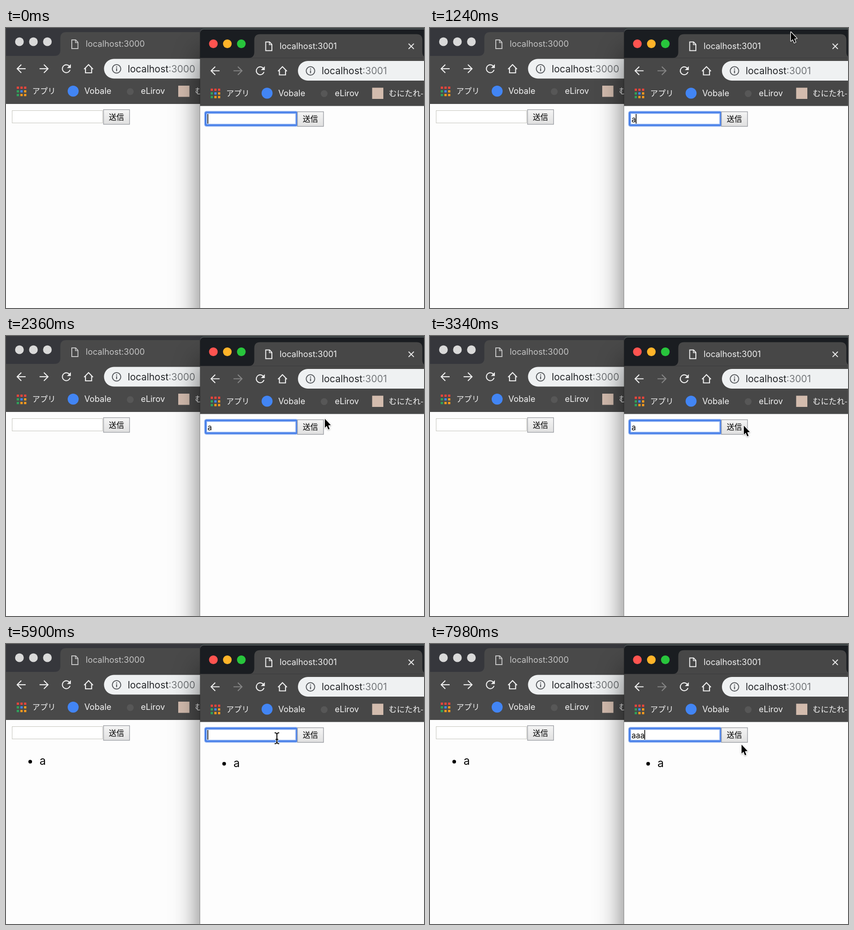
These frames come from a looping animation (915 by 612 pixels, 8 s). An HTML page with a canvas:

```html
<!DOCTYPE html>
<html lang="ja">
<head>
<meta charset="utf-8">
<title>Two synced windows</title>
<style>
  html, body { margin: 0; width: 100%; height: 100%; overflow: hidden; background: #fdfdfd; }
  canvas { display: block; width: 915px; height: 612px; }
</style>
</head>
<body>
<canvas id="stage" width="915" height="612"></canvas>
<script>
const ctx = document.getElementById('stage').getContext('2d');
const LOOP = 8000;
const LATIN = 'Inter, sans-serif';
const KANA = '"Noto Sans CJK JP", "Noto Sans CJK", sans-serif';
const RIGHT = { x: 424.5, y: 4.5 };

// Moments of the session, in ms
const FIRST_KEY = 800, SUBMIT = 3900, REFOCUS = 5500;
const KEYS = [6400, 6600, 6800];
const POINTER_SHOWN = 1000, POINTER_BACK = 7000;
const PATH = [
  [1000, 792, 2], [1240, 789, 8], [1700, 757, 70], [2200, 701, 175],
  [2360, 697, 180], [2700, 686, 195], [3400, 686, 195], [3750, 669, 195],
  [4900, 669, 195], [5350, 593, 206], [7000, 593, 206], [7600, 681, 219]
];

function text(str, x, y, size, color, family = LATIN) {
  ctx.font = `${size}px ${family}`;
  ctx.fillStyle = color;
  ctx.fillText(str, x, y);
}

function circle(x, y, r, color) {
  ctx.beginPath();
  ctx.arc(x, y, r, 0, Math.PI * 2);
  ctx.fillStyle = color;
  ctx.fill();
}

function rect(x, y, w, h, color) {
  ctx.fillStyle = color;
  ctx.fillRect(x, y, w, h);
}

function line(points, color, width = 2.2, close = false) {
  ctx.beginPath();
  points.forEach(([x, y], i) => i ? ctx.lineTo(x, y) : ctx.moveTo(x, y));
  if (close) ctx.closePath();
  ctx.strokeStyle = color;
  ctx.lineWidth = width;
  ctx.stroke();
}

function arrowIcon(cx, dir, color) {
  const tip = cx + dir * 9;
  line([[cx - dir * 9.5, 89], [tip, 89]], color);
  line([[cx, 80], [tip, 89], [cx, 98]], color);
}

function reloadIcon(color) {
  ctx.beginPath();
  ctx.arc(132, 89, 8.6, 0.3, Math.PI * 2 - 0.7);
  ctx.strokeStyle = color;
  ctx.lineWidth = 2.2;
  ctx.stroke();
  ctx.beginPath();
  ctx.moveTo(142, 79);
  ctx.lineTo(142, 87.5);
  ctx.lineTo(133.5, 87.5);
  ctx.fillStyle = color;
  ctx.fill();
}

function homeIcon(color) {
  line([[171, 90], [180.7, 80], [190.4, 90]], color);
  line([[174, 88], [174, 98], [187.4, 98], [187.4, 88]], color);
}

function fileIcon(color) {
  line([[144, 26], [152.5, 26], [157.5, 31.5], [157.5, 45], [144, 45]], color, 2, true);
  line([[152, 26], [152, 32], [157.5, 32]], color, 1.6);
}

function tab(right, color) {
  ctx.beginPath();
  ctx.moveTo(106, 61);
  ctx.quadraticCurveTo(119, 61, 119, 48);
  ctx.lineTo(119, 22);
  ctx.quadraticCurveTo(119, 9, 132, 9);
  ctx.lineTo(right - 13, 9);
  ctx.quadraticCurveTo(right, 9, right, 22);
  ctx.lineTo(right, 48);
  ctx.quadraticCurveTo(right, 61, right + 13, 61);
  ctx.fillStyle = color;
  ctx.fill();
}

function addressBar(port, forwardColor) {
  const icon = '#f0f0f0';
  arrowIcon(33.5, -1, icon);
  arrowIcon(83, 1, forwardColor);
  reloadIcon(icon);
  homeIcon(icon);
  ctx.beginPath();
  ctx.roundRect(214.5, 67.5, 520, 43, 21.5);
  ctx.fillStyle = '#eff1f2';
  ctx.fill();
  ctx.beginPath();
  ctx.arc(242, 89.3, 9.3, 0, Math.PI * 2);
  ctx.strokeStyle = '#56595d';
  ctx.lineWidth = 2;
  ctx.stroke();
  rect(241, 84, 2.2, 2.4, '#56595d');
  rect(241, 88, 2.2, 6.4, '#56595d');
  text('localhost', 266.5, 96.7, 20.9, '#222427');
  const hostWidth = ctx.measureText('localhost').width;
  text(':' + port, 266.5 + hostWidth, 96.7, 20.9, '#74777a');
}

function bookmarks() {
  const white = '#f4f4f4';
  const [r, g, b, o] = ['#e8453c', '#2fa35a', '#4285f4', '#f39a1f'];
  [r, r, r, g, b, o, g, o, o].forEach((color, i) =>
    rect(23.5 + i % 3 * 8, 128 + Math.floor(i / 3) * 8, 5, 5, color));
  text('アプリ', 57.5, 144, 17, white, KANA);
  circle(147, 138, 12, '#4285f4');
  text('Vobale', 171.5, 144.3, 18.2, white);
  circle(272, 139, 7.5, '#575757');
  text('eLirov', 295.3, 144.3, 18.2, white);
  rect(377, 126, 24.5, 24.5, '#d3bcae');
  text('むにたれ-', 413.5, 144, 17.4, white, KANA);
}

function inputBox() {
  rect(13, 180, 199, 28, '#ffffff');
  ctx.lineWidth = 1;
  ctx.strokeStyle = '#c4c4bc';
  ctx.strokeRect(13.5, 180.5, 198, 27);
}

function button() {
  const shade = ctx.createLinearGradient(0, 178, 0, 211);
  shade.addColorStop(0, '#f5f5f5');
  shade.addColorStop(1, '#e0e0e0');
  rect(213, 178, 58, 33, shade);
  ctx.lineWidth = 1.3;
  ctx.strokeStyle = '#96989e';
  ctx.strokeRect(213.5, 178.5, 57, 32);
  text('送信', 225, 200.8, 16.8, '#000', KANA);
}

function focusRing() {
  for (const [width, color] of [[7, 'rgba(88,140,238,.4)'], [4, '#4b82e9']]) {
    ctx.beginPath();
    ctx.roundRect(12.5, 180, 199.5, 28, 2);
    ctx.lineWidth = width;
    ctx.strokeStyle = color;
    ctx.stroke();
  }
}

function page(state, focused) {
  inputBox();
  if (focused) {
    focusRing();
    text(state.typed, 16.8, 201, 16.8, '#000');
    if (state.caret) {
      const x = 16.5 + ctx.measureText(state.typed).width;
      rect(x, 183.5, 1.6, 21, '#000');
    }
  }
  button();
  if (state.sent) {
    circle(53, 257.2, 4, '#000');
    text('a', 73.5, 264, 24.4, '#000');
  }
}

function browser(look, state, focused) {
  rect(0, -5, 500, 70, look.bar);
  tab(look.tabRight, look.chrome);
  rect(0, 61, 500, 105, look.chrome);
  rect(0, 166, 500, 460, '#fdfdfd');
  look.dots.forEach((color, i) => circle(29.4 + i * 30.6, 30, 9.5, color));
  fileIcon(look.title);
  text('localhost:' + look.port, 174.5, 41.3, 18.3, look.title);
  addressBar(look.port, look.forward);
  bookmarks();
  page(state, focused);
}

const BACK = {
  port: 3000, bar: '#36373c', chrome: '#494949', title: '#c4c4c4', tabRight: 520,
  forward: '#f0f0f0', dots: ['#d9d9d9', '#d9d9d9', '#d9d9d9']
};
const FRONT = {
  port: 3001, bar: '#1a1d21', chrome: '#474747', title: '#f0f0f0', tabRight: 487,
  forward: '#858585', dots: ['#ff5450', '#ffb429', '#28c53c']
};

function frontWindow(state) {
  ctx.save();
  ctx.shadowColor = 'rgba(0,0,0,.56)';
  ctx.shadowBlur = 60;
  ctx.shadowOffsetY = 50;
  ctx.beginPath();
  ctx.roundRect(425, 2, 1000, 1400, 8);
  ctx.fillStyle = '#666c6d';
  ctx.fill();
  ctx.restore();

  rect(424, 8, 1, 604, 'rgba(0,0,0,.25)');
  rect(425, 0, 490, 2, '#30383a');
  ctx.save();
  ctx.beginPath();
  ctx.roundRect(425, 3, 1000, 1400, 8);
  ctx.clip();
  ctx.translate(RIGHT.x, RIGHT.y);
  browser(FRONT, state, state.focused);
  line([[456.7, 29.7], [468.3, 41.3]], '#e6e6e6', 2);
  line([[468.3, 29.7], [456.7, 41.3]], '#e6e6e6', 2);
  ctx.restore();
}

function pointerAt(t) {
  const next = PATH.findIndex(p => p[0] > t);
  if (next < 0) return PATH[PATH.length - 1].slice(1);
  const [t0, x0, y0] = PATH[Math.max(0, next - 1)];
  const [t1, x1, y1] = PATH[next];
  const u = t1 > t0 ? (t - t0) / (t1 - t0) : 0;
  const k = u * u * (3 - 2 * u);
  return [x0 + (x1 - x0) * k, y0 + (y1 - y0) * k];
}

function arrowPointer() {
  const shape = [[1, 1], [1, 20.5], [5.2, 16.6], [8.4, 24.2], [11.4, 22.9], [8.3, 15.4], [14, 14.8]];
  ctx.save();
  ctx.shadowColor = 'rgba(0,0,0,.3)';
  ctx.shadowBlur = 3;
  ctx.shadowOffsetY = 1;
  ctx.lineJoin = 'round';
  line(shape, '#fff', 2.6, true);
  ctx.restore();
  ctx.fillStyle = '#000';
  ctx.fill();
}

function beamPointer() {
  for (const [color, width] of [['#fff', 4], ['#000', 2]]) {
    line([[0, -9], [0, 9]], color, width);
    line([[-3, 2.5], [3, 2.5]], color, width);
    for (const s of [-1, 1]) line([[-5, s * 12], [-2, s * 11.5], [0, s * 9], [2, s * 11.5], [5, s * 12]], color, width);
  }
}

function pointer(t) {
  if (t < POINTER_SHOWN || (t >= KEYS[0] && t < POINTER_BACK)) return;
  const [x, y] = pointerAt(t);
  const overInput = x > 437 && x < 637 && y > 184 && y < 214;
  ctx.save();
  ctx.translate(x, y);
  overInput ? beamPointer() : arrowPointer();
  ctx.restore();
}

function stateAt(t) {
  const sent = t >= SUBMIT;
  const count = sent ? KEYS.filter(k => t >= k).length : +(t >= FIRST_KEY);
  const lastEvent = [0, FIRST_KEY, REFOCUS, ...KEYS].filter(e => e <= t).pop();
  return {
    sent,
    typed: 'a'.repeat(count),
    focused: !sent || t >= REFOCUS,
    caret: (t - lastEvent) % 1000 < 500
  };
}

function draw(t) {
  const state = stateAt(t);
  ctx.clearRect(0, 0, 915, 612);
  browser(BACK, state, false);
  frontWindow(state);
  pointer(t);
}

const start = performance.now();
function tick() {
  draw((performance.now() - start) % LOOP);
  requestAnimationFrame(tick);
}
tick();
</script>
</body>
</html>
```
